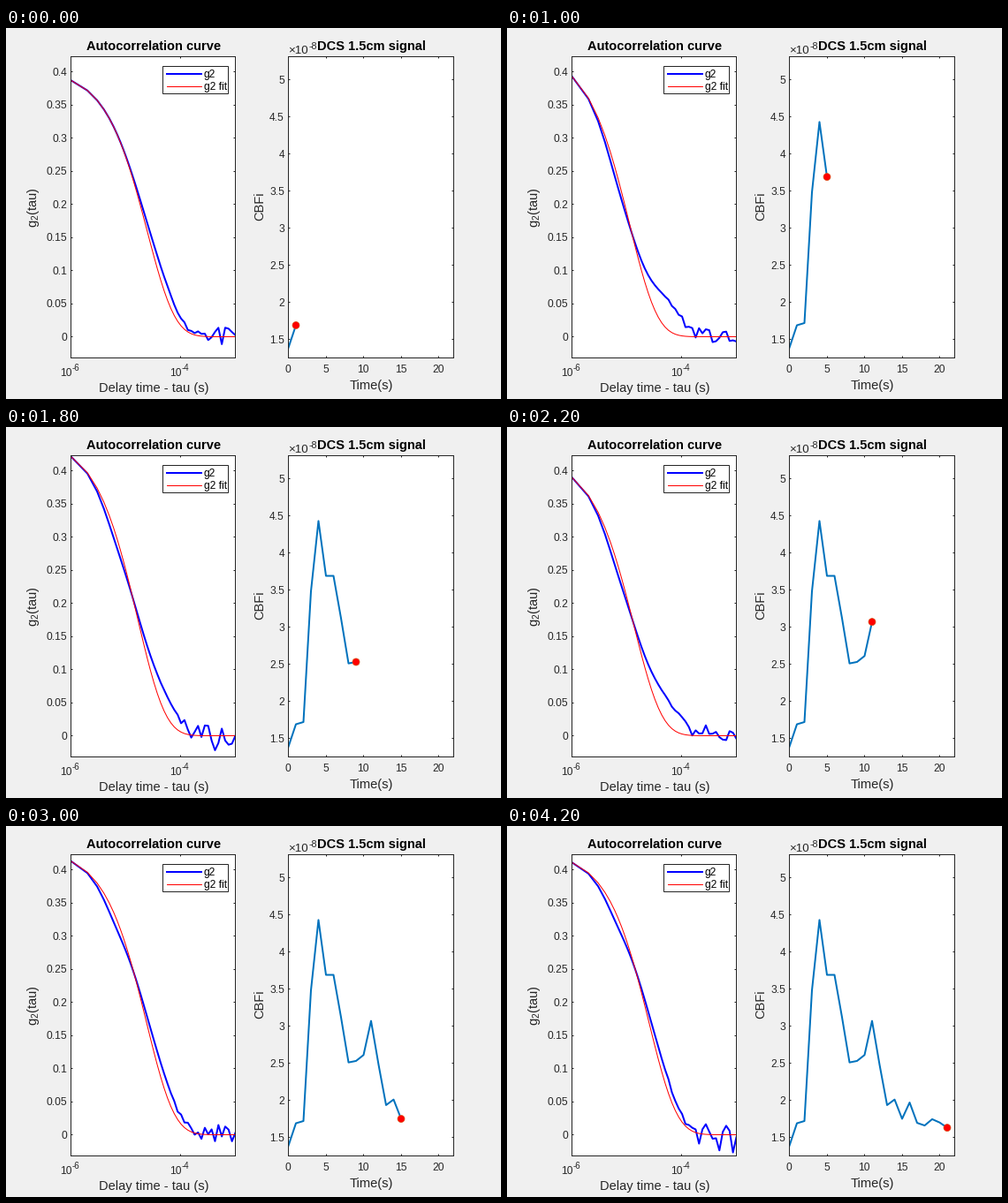
These frames come from a looping animation (560x420 px, 4400 ms). A matplotlib script:

```python
import numpy as np
import matplotlib.pyplot as plt
from matplotlib.animation import FuncAnimation
from matplotlib.patches import Circle, Rectangle

W, H, DPI = 560, 420, 100
PX = 72 / DPI  # points per pixel
EPS = .01      # keeps half-pixel edges from snapping to the next pixel
INK = "#262626"
BLUE, RED = "#0000ff", "#ff0000"

plt.rcParams["font.family"] = "Liberation Sans"
plt.rcParams["mathtext.default"] = "regular"

# blood flow index per second, in 1e-8
FLOW = [1.387, 1.69, 1.72, 3.48, 4.43, 3.69, 3.69, 3.12, 2.51, 2.53, 2.61,
        3.07, 2.48, 1.935, 2.01, 1.75, 1.97, 1.695, 1.66, 1.745, 1.70, 1.63]

# delay times in microseconds
TAU = np.concatenate([np.arange(1, 16), np.geomspace(16, 1000, 30)])
LOG_TAU = np.log10(TAU)


def bump(center, width):
    return np.exp(-((LOG_TAU - center) / width) ** 2 / 2)


def first_value(k):
    return np.interp(k, [0, 1, 2, 4, 8, 10, 12, 16, 20],
                     [.387, .417, .365, .393, .4215, .390, .421, .405, .411])


def fitted(k):
    """Diffusion model, scaled to the first value at 1 microsecond."""
    rate = FLOW[k + 1] / 107
    drop = np.sqrt(1 + TAU * rate) - np.sqrt(1 + rate)
    return first_value(k) * np.exp(-5.2 * drop)


def measured(k):
    """Model with an early sag, a late shoulder and a noisy tail."""
    sag = .015 * (1 - np.exp(-k)) * bump(.8, .22)
    shoulder = .0125 * FLOW[k + 1] * bump(1.7, .3)
    noise = np.random.default_rng(k).normal(0, .009, len(TAU))
    noise *= np.clip((LOG_TAU - 1.5) / .9, 0, 1) ** 2
    return fitted(k) - sag + shoulder + noise


fig = plt.figure(figsize=(W / DPI, H / DPI), dpi=DPI, facecolor="#f0f0f0")


def put(x, y, s, size=12, color=INK, **kw):
    fig.text(x / W, 1 - y / H, s, fontsize=size * PX, color=color, **kw)


def power(x, y, base, exp, size, shift, rise):
    put(x, y, base, size)
    put(x + shift, y - rise, exp, .8 * size)


def panel(left, right, xlim, ylim, xticks, yticks):
    top, bottom = 32.5 - EPS, 373.5 - EPS
    ax = fig.add_axes([(left - EPS) / W, 1 - bottom / H,
                       (right - left) / W, (bottom - top) / H])
    ax.set(xlim=xlim, ylim=ylim, xticks=xticks, yticks=yticks)
    ax.tick_params(direction="in", top=True, right=True,
                   labelbottom=False, labelleft=False, color=INK,
                   width=PX, length=2.4 * PX)
    for side in ax.spines.values():
        side.set(linewidth=PX, color=INK)
    for v in yticks:
        row = bottom - (v - ylim[0]) / (ylim[1] - ylim[0]) * (bottom - top)
        put(left - 4.5, row + 4.4, f"{v:g}", ha="right")
    return ax


def flow_point(t):
    """Stage position of the flow value at second t."""
    return 319.5 + 8.5 * t, 352.5 - 84 * (FLOW[t] - 1.5)


corr = panel(73.5, 259.5, (0, 3), (-.032, 317 / 750),
             [0, 2], np.arange(9) * .05)
for x, exp in ((61.5, "-6"), (185.5, "-4")):
    power(x, 394, "10", exp, 12, 13.4, 6)
put(167, 25, "Autocorrelation curve", 14.67, "black", weight="bold", ha="center")
put(167, 412, "Delay time - tau (s)", 14.67, ha="center")
put(39.5, 203, "g$_2$(tau)", 14.67, rotation=90, ha="right", va="center")

flow_ax = panel(319.5, 506.5, (0, 22), (1.25, 5 + 26 / 84),
                range(0, 21, 5), np.arange(1.5, 5.1, .5))
for v in range(0, 21, 5):
    put(319 + 8.5 * v, 390.5, str(v), ha="center")
power(319.5, 29, "×10", "-8", 13.33, 22.6, 4.5)
put(413, 25, "DCS 1.5cm signal", 14.67, "black", weight="bold", ha="center")
put(413, 409, "Time(s)", 14.67, ha="center")
put(287.5, 202, "CBFi", 14.67, rotation=90, ha="center", va="center")

g2_line, = corr.plot([], [], color=BLUE, lw=2 * PX, solid_joinstyle="round")
fit_line, = corr.plot([], [], color=RED, lw=PX)
flow_line, = flow_ax.plot([], [], color="#0072bd", lw=2 * PX)

# overlay in stage pixels: legend and moving dot
stage = fig.add_axes([0, 0, 1, 1])
stage.set(xlim=(0, W), ylim=(H, 0))
stage.axis("off")
stage.add_patch(Rectangle((177.5 - EPS, 43.5 - EPS), 74, 31,
                          fc="white", ec=INK, lw=PX))
for row, name, color, width in ((52, "g2", BLUE, 2), (66.5 - EPS, "g2 fit", RED, 1)):
    stage.plot([181.5, 221], [row, row], color=color, lw=width * PX)
    stage.text(224, row + 4, name, fontsize=12 * PX, color="black")
dot = stage.add_patch(Circle((0, 0), 4, fc=RED, ec="#d95319", lw=.7 * PX))


def update(i):
    k = max(0, i - 1)  # the opening state is held twice as long
    n = k + 2
    g2_line.set_data(LOG_TAU, measured(k))
    fit_line.set_data(LOG_TAU, fitted(k))
    flow_line.set_data(range(n), FLOW[:n])
    dot.center = flow_point(n - 1)
    return g2_line, fit_line, flow_line, dot


anim = FuncAnimation(fig, update, frames=22, interval=200,
                     repeat=True, repeat_delay=0, blit=False)
plt.show()
```
